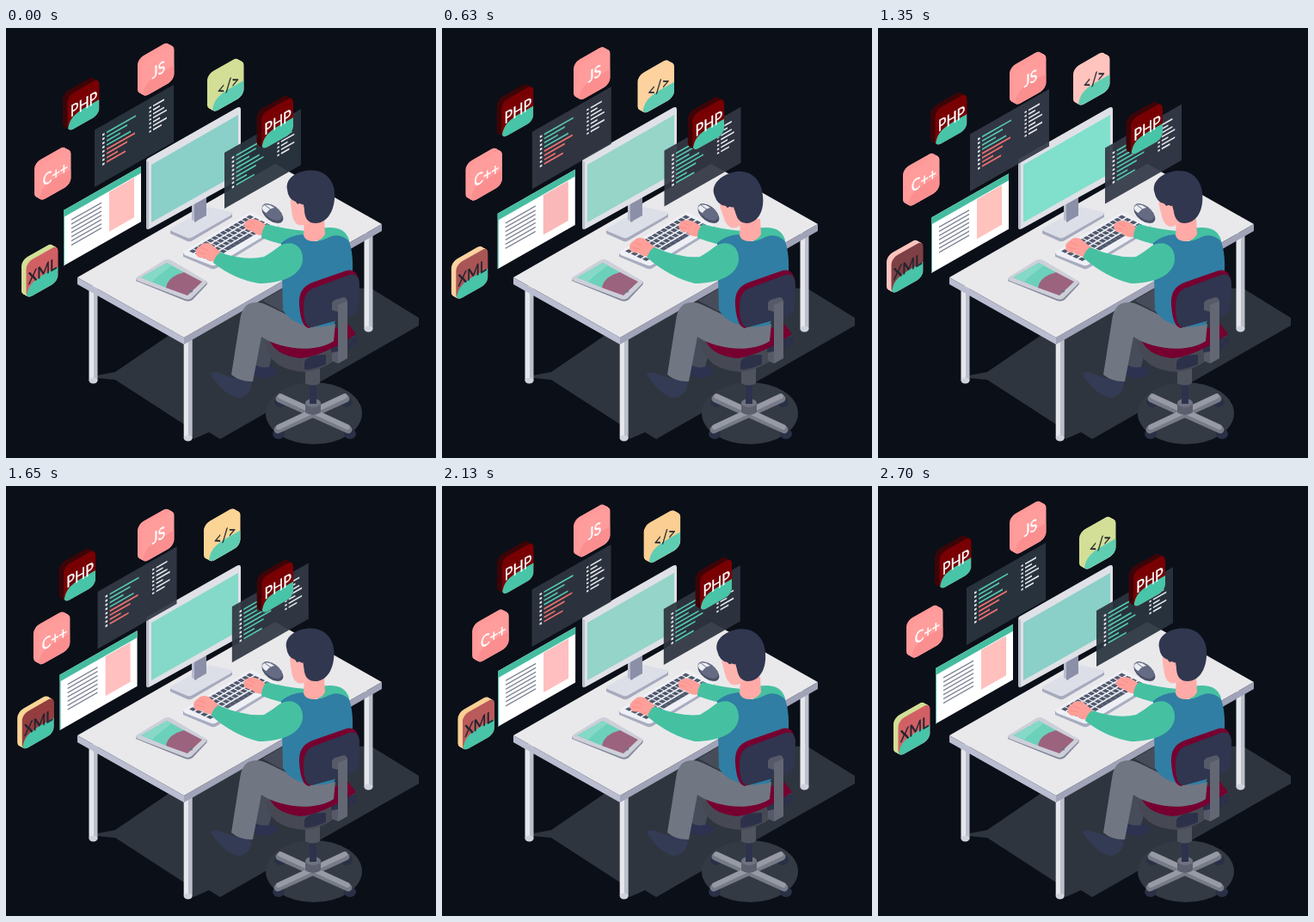
Recreate the animation shown at these times as an HTML page with a canvas. Size 500 by 500 pixels, loop 2.76 s.

```html
<!DOCTYPE html>
<html lang="en">
<head>
<meta charset="utf-8">
<title>Developer at a desk</title>
<style>
html, body { margin: 0; width: 100%; height: 100%; overflow: hidden; background: #0b0f18; }
canvas { display: block; width: 500px; height: 500px; }
</style>
</head>
<body>
<canvas id="stage" width="500" height="500"></canvas>
<script>
const ctx = document.getElementById('stage').getContext('2d');
const LOOP = 2760, STEP = 30, CYCLE = 2700;
const TAU = Math.PI * 2;
const TINT_TIMES = [0, 360, 930, 1350, 1920, 2340, 2700];

const fill = (color, d) => { ctx.fillStyle = color; ctx.fill(new Path2D(d)); };

function stroke(color, width, d, cap = 'butt') {
  ctx.strokeStyle = color;
  ctx.lineWidth = width;
  ctx.lineCap = cap;
  ctx.stroke(new Path2D(d));
}

function oval(color, x, y, rx, ry, turn = 0) {
  ctx.fillStyle = color;
  ctx.beginPath();
  ctx.ellipse(x, y, rx, ry, turn, 0, TAU);
  ctx.fill();
}

function at(x, y, draw) {
  ctx.save();
  ctx.translate(x, y);
  draw();
  ctx.restore();
}

// Draws on an upright plane that recedes up and to the right.
const onWall = (x, y, draw) => at(x, y, () => { ctx.transform(1, -0.57, 0, 1, 0, 0); draw(); });

function rect(color, x, y, w, h) {
  ctx.fillStyle = color;
  ctx.fillRect(x, y, w, h);
}

const smooth = p => p * p * (3 - 2 * p);

// Value at time t between [time, value] keys, eased at both ends.
function keyed(t, keys) {
  for (let i = 1; i < keys.length; i++) {
    const [t0, a] = keys[i - 1], [t1, b] = keys[i];
    if (t <= t1) return a + (b - a) * smooth((t - t0) / (t1 - t0));
  }
  return keys[keys.length - 1][1];
}

// Blends through six colours that are spread over the cycle.
function tint(t, colors) {
  const i = Math.max(0, TINT_TIMES.findLastIndex(k => k <= t && k < CYCLE));
  const p = (t - TINT_TIMES[i]) / (TINT_TIMES[i + 1] - TINT_TIMES[i]);
  const rgb = hex => [1, 3, 5].map(k => parseInt(hex.slice(k, k + 2), 16));
  const a = rgb(colors[i]), b = rgb(colors[(i + 1) % 6]);
  return `rgb(${a.map((v, k) => Math.round(v + (b[k] - v) * p))})`;
}

function leg(x, top, bottom) {
  rect('#e6e7ed', x, top, 6, bottom - top);
  rect('#bcbfcc', x + 5.5, top, 4.5, bottom - top);
  oval('#d0d3dc', x + 5, bottom, 5, 3.4);
}

function drawDesk() {
  fill('#2f353e', 'M106 404L127 400L190 357L300 300L425 303L480 337V346L249 478L236 470L218 478L215 466L127 409L106 407Z');
  oval('#343a43', 358, 448, 56, 36);
  leg(96.5, 300, 410);
  leg(416.5, 238, 350);
  leg(206.7, 362, 477);
  fill('#e9e9eb', 'M83 290L313 158L437 228L207 360Z');
  fill('#bbbed1', 'M83 290L207 360V368L83 298Z');
  fill('#a1a4b8', 'M207 360L437 228V236L207 368Z');
}

function drawTablet() {
  fill('#85889b', 'M151 291V294L208 317Q213 319 217 316L232 300Q234 299 234 295Z');
  fill('#cdcfd9', 'M153 289L184 270Q188 268 192 270L231 293Q236 295 232 298L216 314Q212 317 208 315L153 294Q149 292 153 289Z');
  fill('#6bd1bb', 'M157 290L187 273L207 284Q188 290 186 302Z');
  fill('#85d9c6', 'M157 290L187 273L193 276Q179 286 170 295Z');
  fill('#9b637e', 'M186 302Q188 289 207 284L228 295L211 311Z');
  oval('#6f7388', 215, 306, 2.2, 1.6);
}

function drawMonitor(t) {
  fill('#a7aabd', 'M191 235V239L211 248Q214 249 217 247L263 220V215Z');
  fill('#dcdfe8', 'M192 233L235 208L262 214Q264 216 261 218L217 243Q214 245 211 244L192 236Q190 235 192 233Z');
  fill('#b9bccd', 'M216 203L222 200V226L216 223Z');
  fill('#8b8fa8', 'M219 200L233 192V218L219 226Z');
  fill('#dfe1e7', 'M163 155Q163 152 166 151L268 93Q273 90 273 95V175L168 233Q163 236 163 231Z');
  fill('#b9bdca', 'M163 154L166 156V234Q163 234 163 231Z');
  fill(tint(t, ['#8ad0c8', '#9fd3ca', '#8bd7c6', '#80e0cc', '#8ad3c5', '#a0d5cb']),
    'M169 159L270 101V169L169 226Z');
}

function codeWindow(x, y, w, h, back, tailColor) {
  const lengths = [34, 24, 16, 28, 33, 24, 13, 22];
  const notes = [13, 8, 13, 16, 8, 16, 10];
  const teal = '#55c9b1';
  onWall(x, y, () => {
    ctx.globalAlpha = 0.93;
    rect(back, 0, 0, w, h);
    ctx.globalAlpha = 1;
    const k = w / 92;
    lengths.forEach((n, i) => {
      const row = 10 + i * 4.9;
      rect('#e6e9ee', 9 * k, row, 2.6, 2.3);
      rect(i < 4 ? teal : tailColor, 14 * k, row, n * k, 1.9);
    });
    notes.forEach((n, i) => {
      const row = 10 + i * 4.6;
      rect('#e6e9ee', 63.5 * k, row, 2.4, 2);
      rect('#e6e9ee', 68 * k, row, n * k, 1.8);
    });
  });
}

function pageWindow(x, y, picture) {
  onWall(x, y, () => {
    rect('#ffffff', 0, 0, 90, 64.5);
    rect('#45bca0', 0, 0, 90, 8);
    rect('#45bca0', 0, 0, 1, 64.5);
    for (let i = 0; i < 7; i++) rect('#7b8093', 9, 15.5 + i * 4.9, 35, 1.5);
    rect(picture, 53, 9, 29, 46);
  });
}

function icon(x, y, label, { face, low, side, ink = '#fff' }) {
  const depth = 5.5;
  const tile = (back, paint) => onWall(x + depth - back, y + 22 - back * 0.55, () => {
    ctx.beginPath();
    ctx.roundRect(0, 0, 37, 42.5, 7);
    paint();
  });
  ctx.fillStyle = side;
  for (let back = depth; back > 0; back -= 0.5) tile(back, () => ctx.fill());
  tile(0, () => {
    ctx.fillStyle = face;
    ctx.fill();
    ctx.clip();
    fill(low, 'M0 43C2 24 9 25 37 25V43Z');
  });
  at(x + 24.5, y + 32.3, () => {
    ctx.transform(0.866, -0.5, 0, 1, 0, 0);
    ctx.font = '18.5px Lato, sans-serif';
    ctx.textAlign = 'center';
    ctx.textBaseline = 'middle';
    ctx.fillStyle = ctx.strokeStyle = ink;
    ctx.lineWidth = 0.4;
    ctx.fillText(label, 0, 0);
    ctx.strokeText(label, 0, 0);
  });
}

function drawFloating(t) {
  const angle = t / CYCLE * TAU, cos = Math.cos(angle), sin = Math.sin(angle);
  const drift = (1 - cos) / 2;
  const orbit = (c, a, b) => c + a * cos + b * sin;
  const dark = tint(t, ['#2b353f', '#2d343e', '#393b49', '#343a48', '#313641', '#2c343f']);
  const sand = tint(t, ['#d3de96', '#ffc0bb', '#fbe680', '#ffc4bd', '#f6e572', '#ffb9b4']);
  const rose = tint(t, ['#d16064', '#ce5f62', '#7f4a49', '#7d4045', '#a83a3a', '#cd7a7c']);
  const picture = tint(t, ['#ffc0be', '#f6bcba', '#ffb4b5', '#ffc2bd', '#ffbfc0', '#ffbdbd']);
  const teal = '#48c4a8', ink = '#20242f';
  const pink = { face: '#ff9d9c', low: '#fb8f90', side: '#ff9a99' };
  const wine = { face: '#780003', low: teal, side: '#3d0508' };

  codeWindow(103 + 4 * drift, 118.5 + 5 * drift, 92, 66.5, dark, '#f0716f');
  pageWindow(67 - 5 * drift, 212 + 8.5 * drift, picture);
  codeWindow(254 + 10 * drift, 145 - 5.5 * drift, 89, 65, dark, '#55c9b1');

  icon(153, 17 + 10 * drift, 'JS', pink);
  icon(66 - 5 * drift, 57 + 17 * drift, 'PHP', wine);
  icon(orbit(31, 2, -3.8), orbit(141.5, -3.5, -2.2), 'C++', pink);
  icon(orbit(14, 4, -3.6), orbit(248.5, 2.5, 4.5), 'XML', { face: rose, low: teal, side: sand, ink });
  icon(orbit(230.5, 3.5, -3.4), orbit(31.5, 3.5, 4.9), '</>', { face: sand, low: '#5fcdb2', side: sand, ink });
  icon(orbit(290, 1.5, -4.4), orbit(81.5, -3.5, -1.6), 'PHP', wine);
}

function drawKeyboard() {
  fill('#a9adc0', 'M206 262V266L239 280Q242 281 245 279L317 235V230Z');
  fill('#eff0f5', 'M208 259L282 215Q285 213 288 215L315 229Q318 231 315 233L245 275Q242 277 239 276L208 264Q205 261 208 259Z');
  ctx.save();
  ctx.transform(5.1, -3.04, 6.6, 3.1, 213, 259.5);
  for (let row = 0; row < 4; row++) {
    for (let col = 0; col < 14; col++) {
      const spaceBar = row === 3 && col > 3 && col < 9;
      rect('#50586d', col, row, spaceBar ? 1 : 0.78, 0.72);
    }
  }
  ctx.restore();
}

function drawMouse() {
  oval('#4a5067', 310, 216.5, 14, 8, 0.62);
  oval('#646b83', 309.5, 214, 13.5, 7.5, 0.62);
  fill('#eceef4', 'M298 209Q299 204 307 206L312 209Q306 210 303 215Q298 213 298 209Z');
  stroke('#6b7187', 1, 'M301 206L308 211');
}

function drawChairBase() {
  for (const [x, y] of [[319, 435], [396, 435], [317, 472], [400, 472]]) oval('#2a3045', x, y, 7, 6);
  stroke('#777b88', 9, 'M318 431L398 467M395 431L316 467', 'round');
  stroke('#979aa5', 6, 'M319 428L397 464M394 428L317 464', 'round');
  fill('#5b5f6e', 'M348 436H366V447Q357 453 348 447Z');
  oval('#6f7381', 357, 436, 9, 5);
  rect('#2d334c', 353, 412, 8, 25);
  fill('#50545f', 'M348 390H365V413Q357 418 348 413Z');
}

function drawLowerBody() {
  fill('#2c3250', 'M291 392Q303 388 316 398Q313 408 297 407L288 403Z');
  fill('#474c5a', 'M293 345L316 355L306 394Q297 396 290 392ZM298 317L322 303V330Z');
  fill('#464954', 'M302 365Q304 397 348 400Q384 396 407 358L350 370Z');
  fill('#2c3149', 'M347 388Q352 379 372 380L372 391Q355 398 347 397ZM378 366L408 358V368Q397 376 378 377Z');
  fill('#760030', 'M305 359Q310 380 342 384Q368 382 407 356L398 344L350 360Z');
  fill('#343b55', 'M238 403Q239 399 248 401Q260 406 270 408L286 410Q286 426 272 430Q256 430 238 403Z');
  fill('#717683', 'M383 344C350 350 325 331 298 320C281 316 274 325 272 340L262 403Q273 412 287 411L297 359C318 373 358 379 381 364Z');
}

function drawHead(t) {
  const lean = keyed(t, [[0, 0], [630, 1], [930, 1], [1800, 0], [2340, 1], [2700, 0]]);
  fill('#ffaaa6', 'M347 222H370L371 240Q366 248 357 248Q348 248 346 241Z');
  at(358 - 1.5 * lean, 235, () => {
    ctx.rotate(-0.195 * lean);
    ctx.translate(-358, -235);
    fill('#ffb3af', 'M331 193Q330 203 332 212Q333 226 340 229Q347 231 356 224L360 195Z');
    fill('#30374f', 'M327 188C324 173 342 165 356 165.500C374 166 384 181 382 198C381 215 372 227 360 227Q348 227 347 213L346 205Q340 208 337 202Q328 199 327 188Z');
    oval('#ffb3af', 342, 211, 4.6, 7, -0.15);
  });
}

function drawUpperBody(t) {
  const far = (1 - Math.cos(3 * t / CYCLE * TAU)) / 2;
  const lift = keyed(t, [[0, 0], [450, 1], [1950, 1], [2550, 0], [2700, 0]]);
  const skin = '#ff9f99', sleeve = '#45c1a1';
  const dx = -2.5 * lift, dy = -6 * lift;

  at(-3 * far, 2 * far, () => {
    fill(skin, 'M277 229Q278 222 288 222Q296 223 304 231L300 241Q291 242 286 236Q278 236 277 229Z');
    stroke('#f58a86', 0.8, 'M279 230L287 232M283 225L290 229');
  });
  fill(sleeve, 'M303 228Q325 234 348 236L345 256Q321 253 297 244Q297 234 303 228Z');

  fill(sleeve, 'M366 233Q394 228 399 247L390 258L362 250Z');
  fill('#307ea3', 'M345 240Q356 253 372 245Q387 236 399 248C405 265 403 285 402 300L381 345C355 352 330 343 322 328L320 250Q330 241 345 240Z');

  at(dx, dy, () => {
    fill(skin, 'M221 263Q219 257 226 253Q230 248 238 251L250 261L243 272Q235 271 230 267Q222 268 221 263Z');
    stroke('#f58a86', 0.8, 'M223 261L233 263M226 255L235 259');
  });
  fill(sleeve, `M${249 + dx} ${261 + dy}Q277 ${271 + dy / 2} 300 266Q309 261 319 253C332 246 346 253 345 270
    C343 288 321 297 294 297Q265 ${292 + dy / 3} ${241 + dx} ${273 + dy}Q${243 + dx} ${265 + dy} ${249 + dx} ${261 + dy}Z`);
}

function drawChairBack() {
  fill('#760030', 'M341 322C340 307 346 300 356 296L396 282Q407 279 410 292L400 310L353 349Q343 349 341 322Z');
  fill('#30364f', 'M346 324C346 312 350 305 359 302L399 287Q411 284 411 298L410 326Q407 334 396 337L356 348Q346 349 346 324Z');
  fill('#565a68', 'M379 320Q380 316 386 315L393 313Q397 314 397 319V384L386 390L379 387V378L386 376V330L379 328Z');
  fill('#636773', 'M386 322L397 317V384L386 390Z');
}

function draw(t) {
  rect('#0b0f18', 0, 0, 500, 500);
  drawDesk();
  drawMonitor(t);
  drawTablet();
  drawKeyboard();
  drawMouse();
  drawFloating(t);
  drawChairBase();
  drawLowerBody();
  drawUpperBody(t);
  drawHead(t);
  drawChairBack();
}

function frame() {
  const now = performance.now() % LOOP;
  draw(Math.min(CYCLE, Math.floor(now / STEP) * STEP));
  requestAnimationFrame(frame);
}
frame();
</script>
</body>
</html>
```
